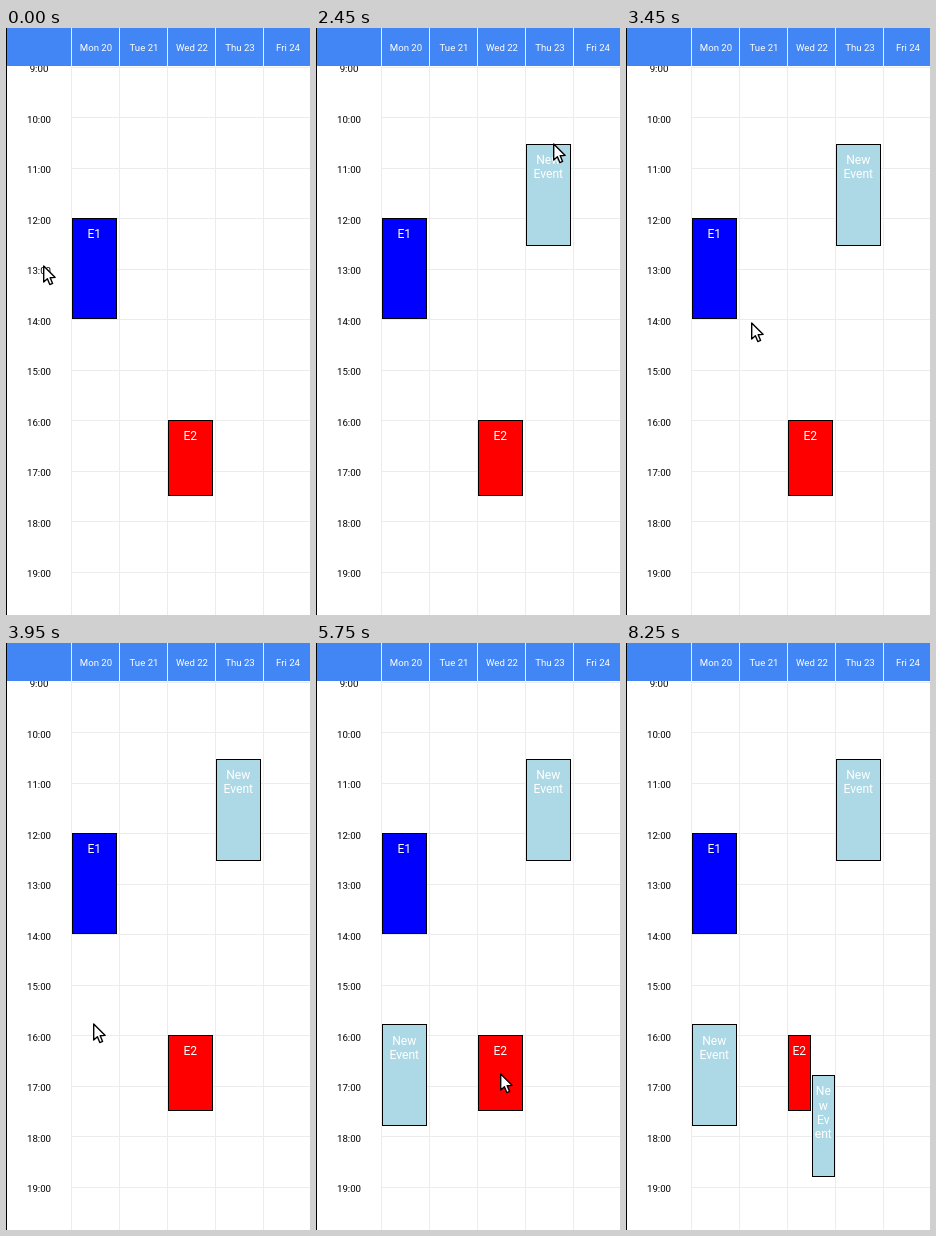
These frames come from a looping animation (304 by 587 pixels, 8.5 s). An HTML page with a canvas:

```html
<!DOCTYPE html>
<html lang="en">
<head>
<meta charset="utf-8">
<title>Week calendar</title>
<style>
html, body { margin: 0; width: 100%; height: 100%; overflow: hidden; background: #fff; }
canvas { display: block; width: 304px; height: 587px; }
</style>
</head>
<body>
<canvas id="stage"></canvas>
<script>
const W = 304, H = 587, LOOP = 8500, STEP = 50;
const HEAD = 38, LEFT = 65, COL = 48, HOUR = 50.5;
const FONT = 'Roboto, Arial, sans-serif';
const DAYS = ['Mon 20', 'Tue 21', 'Wed 22', 'Thu 23', 'Fri 24'];
const LINE = '#ececec', FRESH = '#add8e6';

const canvas = document.getElementById('stage');
const ctx = canvas.getContext('2d');
const dpr = window.devicePixelRatio || 1;
canvas.width = W * dpr;
canvas.height = H * dpr;
ctx.scale(dpr, dpr);

// pointer stops: time of arrival, place, rest before moving on
const STOPS = [
  { at: 0, x: 37, y: 237 },
  { at: 200, x: 36, y: 236, rest: 300 },
  { at: 950, x: 237, y: 115, rest: 1600 },
  { at: 3000, x: 199, y: 299 },
  { at: 3450, x: 125, y: 294 },
  { at: 3950, x: 87, y: 380, rest: 1050 },
  { at: 5600, x: 182, y: 430 },
  { at: 5750, x: 184, y: 430, rest: 1250 },
  { at: 7300, x: 231, y: 570 },
  { at: 7850, x: 144, y: 79 },
  { at: 8200, x: 15, y: -10 }
];
const path = STOPS.flatMap(s => s.rest ? [s, { at: s.at + s.rest, x: s.x, y: s.y }] : [s]);

function slope(i, axis) {
  const a = path[i], b = path[i + 1];
  return a && b ? (b[axis] - a[axis]) / (b.at - a.at) : 0;
}

// zero at rests and turning points, so the pointer never overshoots
function tangent(i, axis) {
  const a = slope(i - 1, axis), b = slope(i, axis);
  return a * b > 0 ? 2 * a * b / (a + b) : 0;
}

function pointerAt(t, axis) {
  const i = Math.max(0, path.findIndex(p => p.at >= t) - 1);
  const a = path[i], b = path[i + 1], d = b.at - a.at;
  const u = (t - a.at) / d, v = 1 - u;
  return Math.round(
    v * v * (a[axis] * (1 + 2 * u) + tangent(i, axis) * d * u) +
    u * u * (b[axis] * (1 + 2 * v) - tangent(i + 1, axis) * d * v));
}

function rect(x, y, w, h, color) {
  ctx.fillStyle = color;
  ctx.fillRect(x, y, w, h);
}

function label(str, x, y, size, color) {
  ctx.font = size + 'px ' + FONT;
  ctx.textAlign = 'center';
  ctx.fillStyle = color;
  ctx.fillText(str, x, y);
}

function drawGrid() {
  rect(0, 0, W, H, '#fff');
  for (let i = 0; i < 11; i++) {
    const y = 39 + i * HOUR;
    rect(LEFT, Math.floor(y), W - LEFT, 1, LINE);
    label(9 + i + ':00', 33, y + 5, 9.7, '#000');
  }
  for (let i = 0; i < 5; i++) rect(LEFT + i * COL, HEAD, 1, H, LINE);
}

function drawHeader() {
  rect(0, 0, W, HEAD, '#4285f4');
  DAYS.forEach((day, i) => {
    const x = LEFT + i * COL;
    rect(x, 0, 1, HEAD, LINE);
    label(day, x + 25, 23, 9.6, '#fff');
  });
  rect(0, 0, 1, H, '#000');
}

function drawEvent(day, hour, hours, color, lines, w = 45, shift = 0) {
  const x = LEFT + 1 + day * COL + shift;
  const top = 190 + (hour - 12) * HOUR;
  const y = Math.floor(top), h = Math.ceil(top + hours * HOUR) - y;
  rect(x, y, w, h, '#000');
  rect(x + 1, y + 1, w - 2, h - 2, color);
  lines.forEach((line, i) => label(line, x + w / 2 - 0.2, top + 20 + i * 14.1, 12.1, '#fff'));
}

function drawPointer(x, y) {
  ctx.save();
  ctx.translate(x, y);
  ctx.beginPath();
  for (const [px, py] of [[0.7, 1], [0.7, 17], [4.4, 13.7], [6.8, 19.6], [9.6, 18.4], [7.2, 12.7], [12.2, 12.4]]) {
    ctx.lineTo(px, py);
  }
  ctx.closePath();
  ctx.fillStyle = '#fff';
  ctx.fill();
  ctx.lineWidth = 1.4;
  ctx.lineJoin = 'round';
  ctx.strokeStyle = '#000';
  ctx.stroke();
  ctx.restore();
}

function draw(t) {
  const split = t >= 7000, half = 23;
  drawGrid();
  drawEvent(0, 12, 2, '#00f', ['E1']);
  drawEvent(2, 16, 1.5, '#f00', ['E2'], split ? half : 45);
  if (t >= 2450) drawEvent(3, 10.54, 2, FRESH, ['New', 'Event']);
  if (t >= 5000) drawEvent(0, 15.8, 2, FRESH, ['New', 'Event']);
  if (split) drawEvent(2, 16.8, 2, FRESH, ['Ne', 'w', 'Ev', 'ent'], half, half + 1);
  drawHeader();
  if (t <= path[path.length - 1].at) drawPointer(pointerAt(t, 'x'), pointerAt(t, 'y'));
}

const start = performance.now();
function tick() {
  const t = (performance.now() - start) % LOOP;
  draw(Math.floor(t / STEP) * STEP);
  requestAnimationFrame(tick);
}
tick();
</script>
</body>
</html>
```
